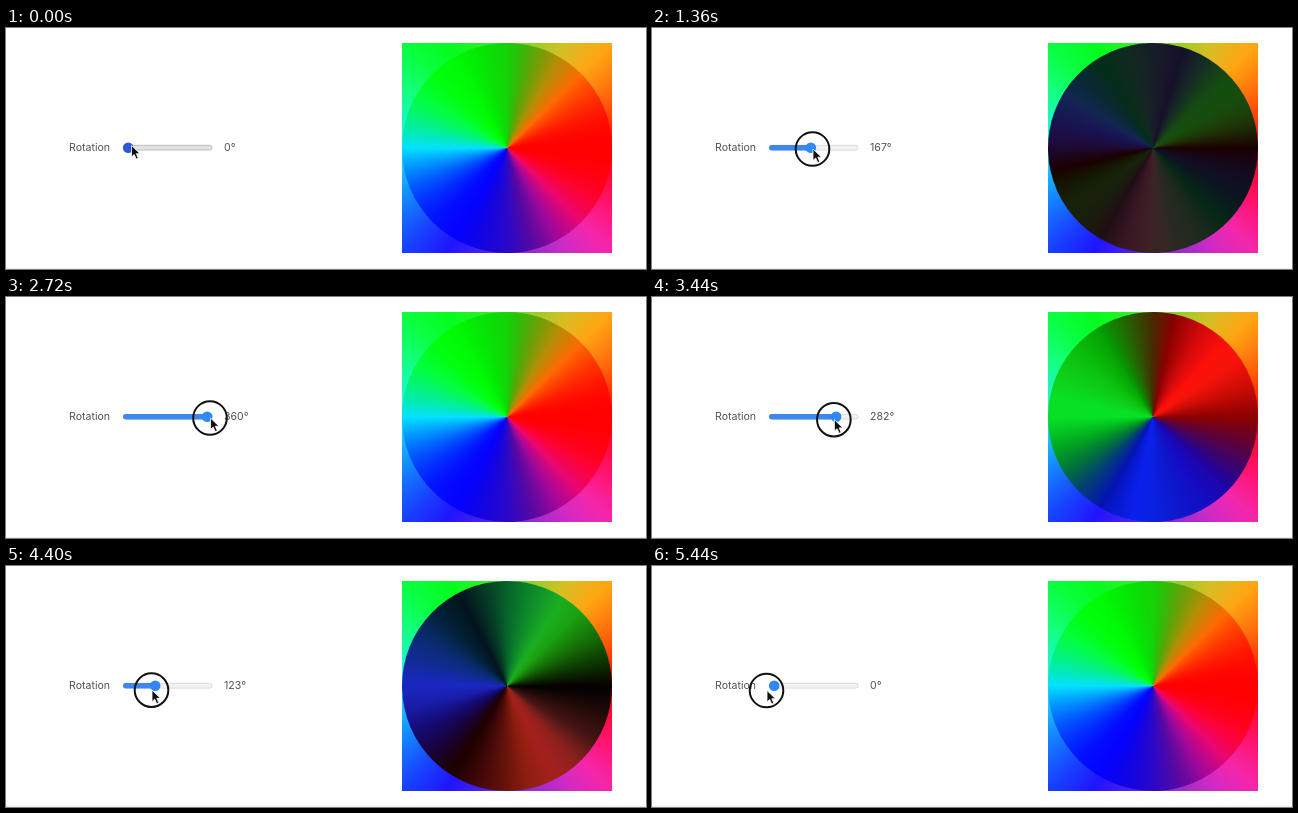
Animation of 640x241 px, one loop 5520 ms. Source, as an HTML page:

```html
<!DOCTYPE html>
<html lang="en">
<head>
<meta charset="utf-8">
<title>Rotation slider</title>
<style>
  html, body { margin: 0; width: 100%; height: 100%; overflow: hidden; background: #fff; }
  svg { position: absolute; left: 0; top: 0; }
  text { font: 10.6px Inter, "Open Sans", sans-serif; fill: #505357; }
  .wheel {
    position: absolute; left: 396px; top: 14.5px; width: 210px; height: 210px;
    isolation: isolate;
  }
  .wheel, #disc {
    /* clockwise from the right-hand side */
    background: conic-gradient(from 90deg,
      rgb(255 0 0) 0deg, rgb(255 20 112) 30deg, rgb(245 38 170) 45deg,
      rgb(205 42 198) 60deg, rgb(150 45 203) 75deg, rgb(105 42 226) 90deg,
      rgb(32 20 255) 120deg, rgb(24 64 255) 135deg, rgb(20 140 255) 155deg,
      rgb(30 240 255) 180deg, rgb(20 255 128) 210deg, rgb(10 255 64) 225deg,
      rgb(5 252 30) 240deg, rgb(72 232 42) 270deg, rgb(152 206 42) 285deg,
      rgb(214 190 36) 300deg, rgb(255 165 18) 315deg, rgb(255 112 12) 330deg,
      rgb(255 0 0) 360deg);
  }
  #disc {
    position: absolute; inset: 0; border-radius: 50%;
    mix-blend-mode: multiply;
  }
</style>
</head>
<body>
<div class="wheel"><div id="disc"></div></div>
<svg width="640" height="241">
  <rect y="240" width="640" height="1" fill="#ececec"/>
  <text x="63" y="123.3">Rotation</text>
  <text id="value" x="218" y="123.3"></text>
  <rect id="track" x="117.5" y="117.3" width="88.5" height="4.8" rx="2.4"/>
  <rect id="fill" x="117" y="117" height="5.4" rx="2.7" fill="#3d87ee"/>
  <circle id="thumb" cy="119.7" r="5.3"/>
  <g id="pointer">
    <circle id="ring" r="16.8" fill="none" stroke="#111" stroke-width="2"/>
    <path d="M.5 0V11.5L3.2 9 5.2 13.6 7.3 12.7 5.3 8.2H9Z" fill="#111" stroke="#fff" stroke-width=".8"/>
  </g>
</svg>
<script>
const LOOP = 5520, STEP = 80, PRESS = 160;
const el = id => document.getElementById(id);
const set = (id, attrs) => {
  for (const key in attrs) el(id).setAttribute(key, attrs[key]);
};

// Keys are [time, value] pairs.
const angleKeys = [[0, 0], [280, 0], [1360, 167], [1920, 252], [2640, 360],
  [2960, 360], [4000, 190], [4800, 55], [5160, 0], [LOOP, 0]];
const xKeys = [[0, 125], [280, 125], [1360, 160.5], [1920, 180.5], [2720, 204],
  [2860, 204], [4000, 160.5], [4800, 130.5], [5280, 114.5], [LOOP, 114.5]];
const yKeys = [[0, 117.5], [280, 119], [1360, 121], [2720, 121], [4000, 124], [LOOP, 124.5]];

function at(keys, t) {
  const i = keys.findIndex(k => k[0] > t);
  const [t0, v0] = keys[i - 1], [t1, v1] = keys[i];
  return v0 + (v1 - v0) * (t - t0) / (t1 - t0);
}

function draw(now) {
  const t = Math.floor(now % LOOP / STEP) * STEP;
  const angle = Math.round(at(angleKeys, t));
  const thumbX = 122.2 + 79 * angle / 360;
  const pressed = t >= PRESS;

  el("disc").style.transform = `rotate(${angle}deg)`;
  el("value").textContent = angle + "°";
  set("fill", { width: angle ? thumbX - 117 : 0 });
  set("thumb", { cx: thumbX, fill: pressed ? "#2f88f5" : "#2f57cf" });
  set("track", {
    fill: pressed ? "#f3f2ef" : "#e0e3e1",
    stroke: pressed ? "#dedcd8" : "#bcbfbd"
  });
  set("ring", { visibility: pressed ? "visible" : "hidden" });
  set("pointer", { transform: `translate(${at(xKeys, t)} ${at(yKeys, t)})` });
}

const start = performance.now();
function tick() {
  draw(performance.now() - start);
  requestAnimationFrame(tick);
}
tick();
</script>
</body>
</html>
```
